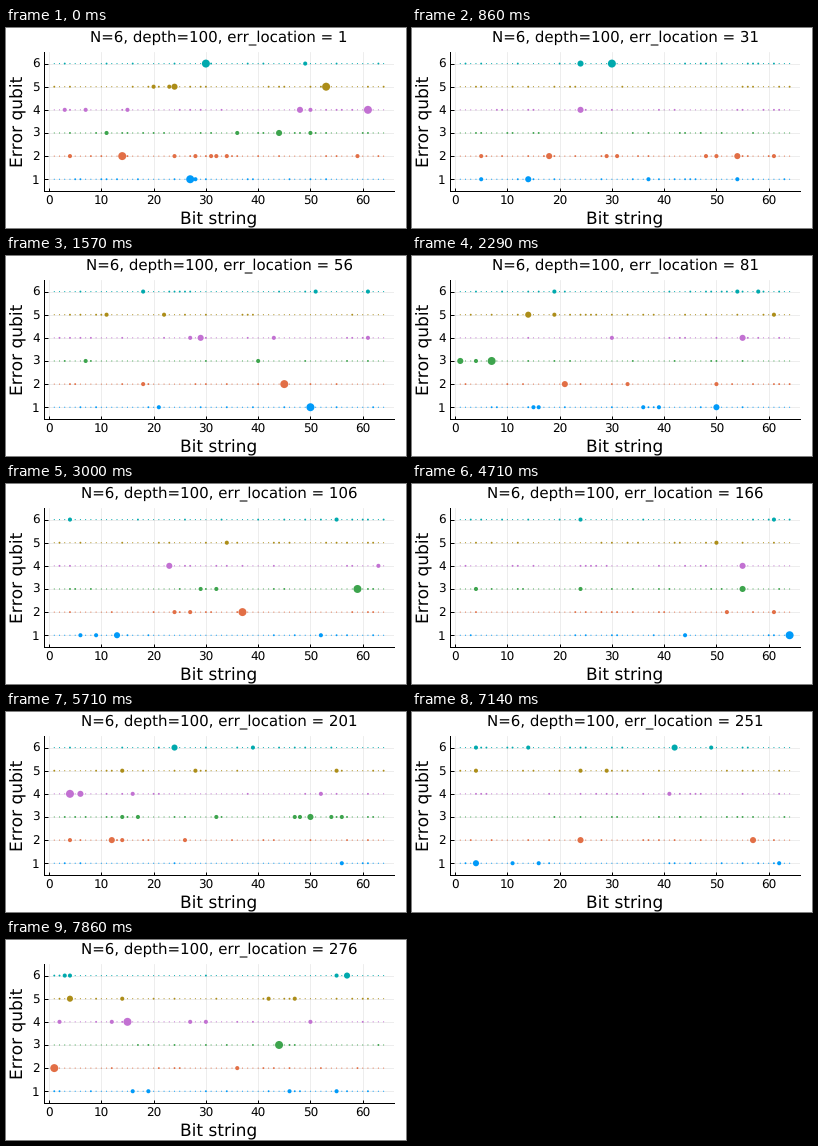
A matplotlib script for the animation above (8000 ms loop, 400 by 200 pixels).

```python
import numpy as np
import matplotlib.pyplot as plt
from matplotlib.animation import FuncAnimation

W, H, DPI = 400, 200, 100
LOOP_MS, TICK_MS, STEPS = 8000, 40, 56
LEAD_MS = 35  # lets each step begin on the tick that contains its start
LEFT, RIGHT, TOP, BOTTOM = 38.4, 387.5, 24, 162.8
XMIN, XMAX = -0.89, 65.89
ROWS, STATES = 6, 64
COLORS = ["#009af9", "#e26f46", "#3da44d", "#c271d2", "#ac8d18", "#00a9ad"]

DIAMETERS = np.array([1.1, 1.9, 4.1, 6.1, 8.0])  # px, from no hits to many
CUTS = [0.81, 0.957, 0.988, 0.996]
HOT = np.array([4, 14, 24, 30, 55, 61])  # bit strings that are hit most often

plt.rcParams["font.family"] = "DejaVu Sans"
plt.rcParams["text.hinting"] = "none"
plt.rcParams["text.hinting_factor"] = 1


def pt(px):
    return px * 72 / DPI


def px_x(v):
    return LEFT + (v - XMIN) / (XMAX - XMIN) * (RIGHT - LEFT)


def px_y(v):
    return BOTTOM - (v - 0.5) / ROWS * (BOTTOM - TOP)


def label(x, y, text, px, **kw):
    return fig.text(x / W, 1 - y / H, text, fontsize=pt(px),
                    ha="center", va="baseline", **kw)


def diameters(step):
    rng = np.random.default_rng(step)
    level = rng.random((ROWS, STATES))
    level[:, HOT - 1] **= 1 / 3
    return DIAMETERS[np.searchsorted(CUTS, level.ravel())]


fig = plt.figure(figsize=(W / DPI, H / DPI), dpi=DPI, facecolor="white")
ax = fig.add_axes([LEFT / W, 1 - BOTTOM / H, (RIGHT - LEFT) / W, (BOTTOM - TOP) / H])
ax.set(xlim=(XMIN, XMAX), ylim=(0.5, ROWS + 0.5))
xticks, yticks = range(0, 61, 10), range(1, ROWS + 1)
ax.set_xticks(xticks, [""] * len(xticks))
ax.set_yticks(yticks, [""] * len(yticks))
ax.tick_params(direction="in", length=pt(3.5), width=pt(1))
ax.set_axisbelow(True)
ax.grid(color="black", alpha=0.1, lw=pt(0.7))
ax.spines[["top", "right"]].set_visible(False)
ax.spines[["left", "bottom"]].set_linewidth(pt(1))

for v in xticks:
    label(px_x(v), 176.8, v, 11.6)
for v in yticks:
    label(30, px_y(v) + 4.3, v, 11.6)
label(213, 196.3, "Bit string", 16.6)
label(17.7, 93.5, "Error qubit", 16.6, rotation=90, rotation_mode="anchor")
title = label(213, 13.2, "", 14.85)

gx, gy = np.meshgrid(np.arange(1, STATES + 1), np.arange(1, ROWS + 1))
dots = ax.scatter(gx.ravel(), gy.ravel(), c=np.repeat(COLORS, STATES),
                  linewidths=0, zorder=3, clip_on=False)


def update(tick):
    step = int((tick * TICK_MS + LEAD_MS) * STEPS / LOOP_MS)
    dots.set_sizes(pt(diameters(step)) ** 2)
    title.set_text(f"N=6, depth=100, err_location = {5 * step + 1}")
    return dots, title


anim = FuncAnimation(fig, update, frames=LOOP_MS // TICK_MS, interval=TICK_MS,
                     init_func=lambda: update(0), repeat=True, repeat_delay=0)
plt.show()
```
